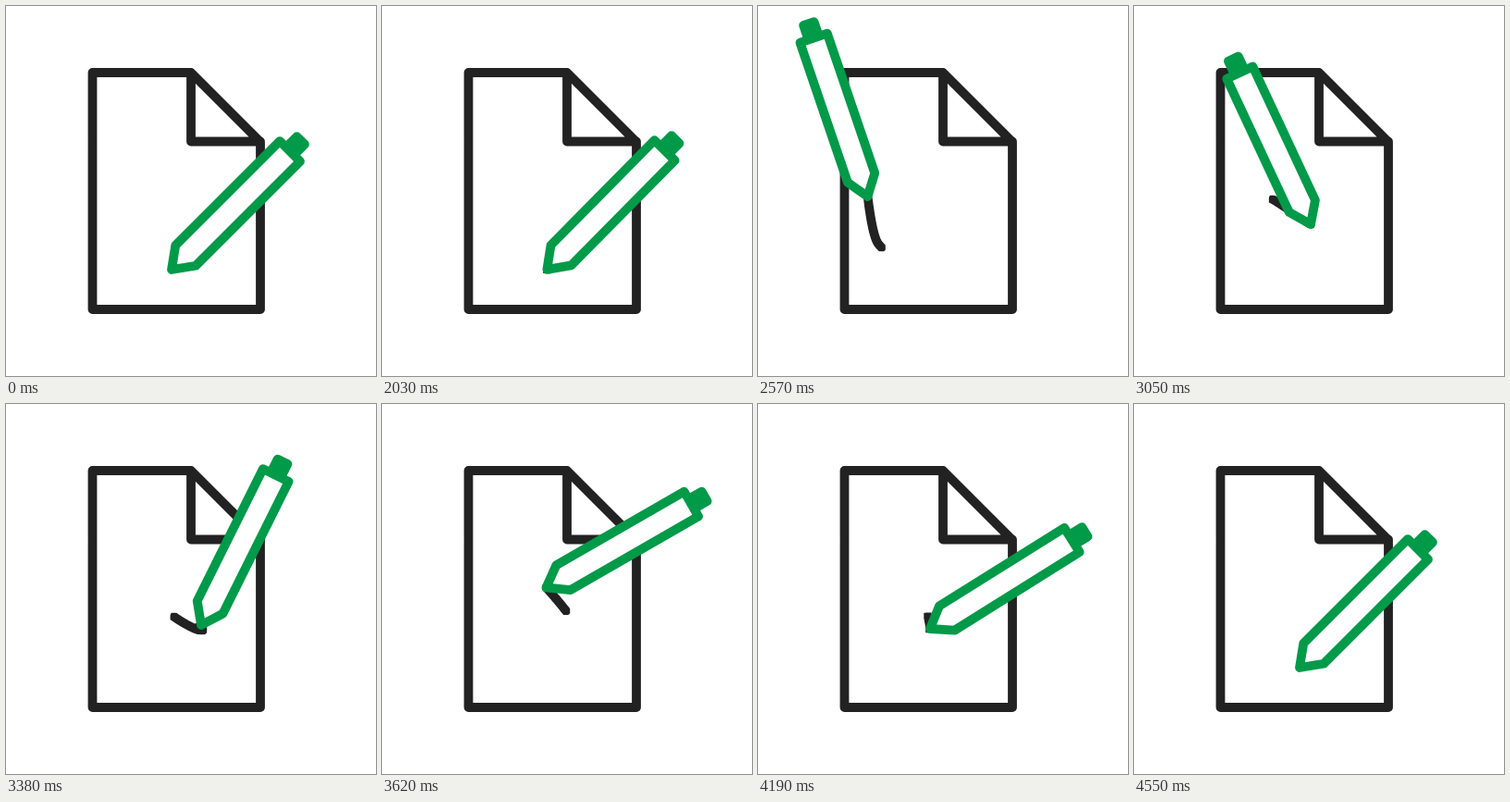
An HTML page with a canvas for the animation above (4.64 s loop, 400 by 400 pixels).

```html
<!DOCTYPE html>
<html lang="en">
<head>
<meta charset="utf-8">
<title>Pen signing a page</title>
<style>
  html, body { margin: 0; width: 100%; height: 100%; overflow: hidden; background: #fff; }
  canvas { display: block; }
</style>
</head>
<body>
<canvas width="400" height="400"></canvas>
<script>
const ctx = document.querySelector('canvas').getContext('2d');
const LOOP = 4640, REST = 2000, END = 4550, STEP = 30;
const INK = '#222', GREEN = '#009a49', LINE = 9.8, MAX_INK = 61;

const pagePath = new Path2D('M200 72H93.5V328H275V147ZV146.5H275');
const bodyPath = new Path2D('M0 0L-15.5 -21.5V-181H15.5V-21.5Z');
const capPath = new Path2D('M-6 -183V-197.5H6V-183Z');

// The signature: a smooth curve through [time, x, y]
const strokeKeys = [
  [REST, 179, 285], [2400, 130, 257], [2570, 118.5, 206], [2680, 122, 200],
  [2855, 148, 208], [3050, 191, 236], [3310, 212, 245], [3380, 211, 239],
  [3650, 175, 196], [3890, 177, 209.5], [4190, 186, 243], [END, 179, 285]
];

// The hand turns with ease between [time, degrees]
const tiltKeys = [[REST, 45], [2710, -26], [3010, -26], [3660, 61], [4050, 61], [END, 45]];

const smooth = u => u * u * (3 - 2 * u);

function locate(keys, t) {
  let i = 0;
  while (i < keys.length - 2 && t >= keys[i + 1][0]) i++;
  const span = keys[i + 1][0] - keys[i][0];
  return { i, span, u: (t - keys[i][0]) / span };
}

function tiltAt(t) {
  const { i, u } = locate(tiltKeys, t);
  const from = tiltKeys[i][1], to = tiltKeys[i + 1][1];
  return from + (to - from) * smooth(u);
}

function slope(i, axis) {
  const before = strokeKeys[i - 1], after = strokeKeys[i + 1];
  return before && after ? (after[axis] - before[axis]) / (after[0] - before[0]) : 0;
}

function tipAt(t) {
  const { i, u, span } = locate(strokeKeys, t);
  return [1, 2].map(axis => {
    const from = strokeKeys[i][axis], to = strokeKeys[i + 1][axis];
    const bend = (1 - u) * slope(i, axis) - u * slope(i + 1, axis);
    return from + (to - from) * smooth(u) + span * u * (1 - u) * bend;
  });
}

// Follow the tip backwards until the ink, which shortens over time, runs out
function inkPoints(t) {
  let left = MAX_INK * Math.cos(Math.PI / 2 * (t - REST) / (END - REST));
  const points = [tipAt(t)];
  for (let back = t - 4; back >= REST && left > 0; back -= 4) {
    const [x, y] = points[points.length - 1], next = tipAt(back);
    left -= Math.hypot(next[0] - x, next[1] - y);
    points.push(next);
  }
  return points;
}

function drawInk(t) {
  const points = inkPoints(t), pad = 4.3;
  const xs = points.map(p => p[0]), ys = points.map(p => p[1]);
  const left = Math.min(...xs) - pad, top = Math.min(...ys) - pad;
  ctx.save();
  ctx.beginPath();
  ctx.rect(left, top, Math.max(...xs) + pad - left, Math.max(...ys) + pad - top);
  ctx.clip();
  ctx.beginPath();
  points.forEach(p => ctx.lineTo(...p));
  ctx.lineCap = 'square';
  ctx.stroke();
  ctx.restore();
}

function drawPen(t) {
  ctx.save();
  ctx.translate(...tipAt(t));
  ctx.rotate(tiltAt(t) * Math.PI / 180);
  ctx.strokeStyle = ctx.fillStyle = GREEN;
  ctx.fill(capPath);
  ctx.stroke(capPath);
  ctx.fillStyle = '#fff';
  ctx.fill(bodyPath);
  ctx.stroke(bodyPath);
  ctx.restore();
}

function draw(now) {
  const moving = Math.max(0, now % LOOP - REST);
  const t = Math.min(END, REST + Math.floor(moving / STEP) * STEP);
  ctx.fillStyle = '#fff';
  ctx.fillRect(0, 0, 400, 400);
  ctx.lineJoin = ctx.lineCap = 'round';
  ctx.strokeStyle = INK;
  ctx.lineWidth = LINE;
  ctx.stroke(pagePath);
  if (t > REST && t < END) drawInk(t);
  drawPen(t);
}

function tick() {
  draw(performance.now());
  requestAnimationFrame(tick);
}
tick();
</script>
</body>
</html>
```
